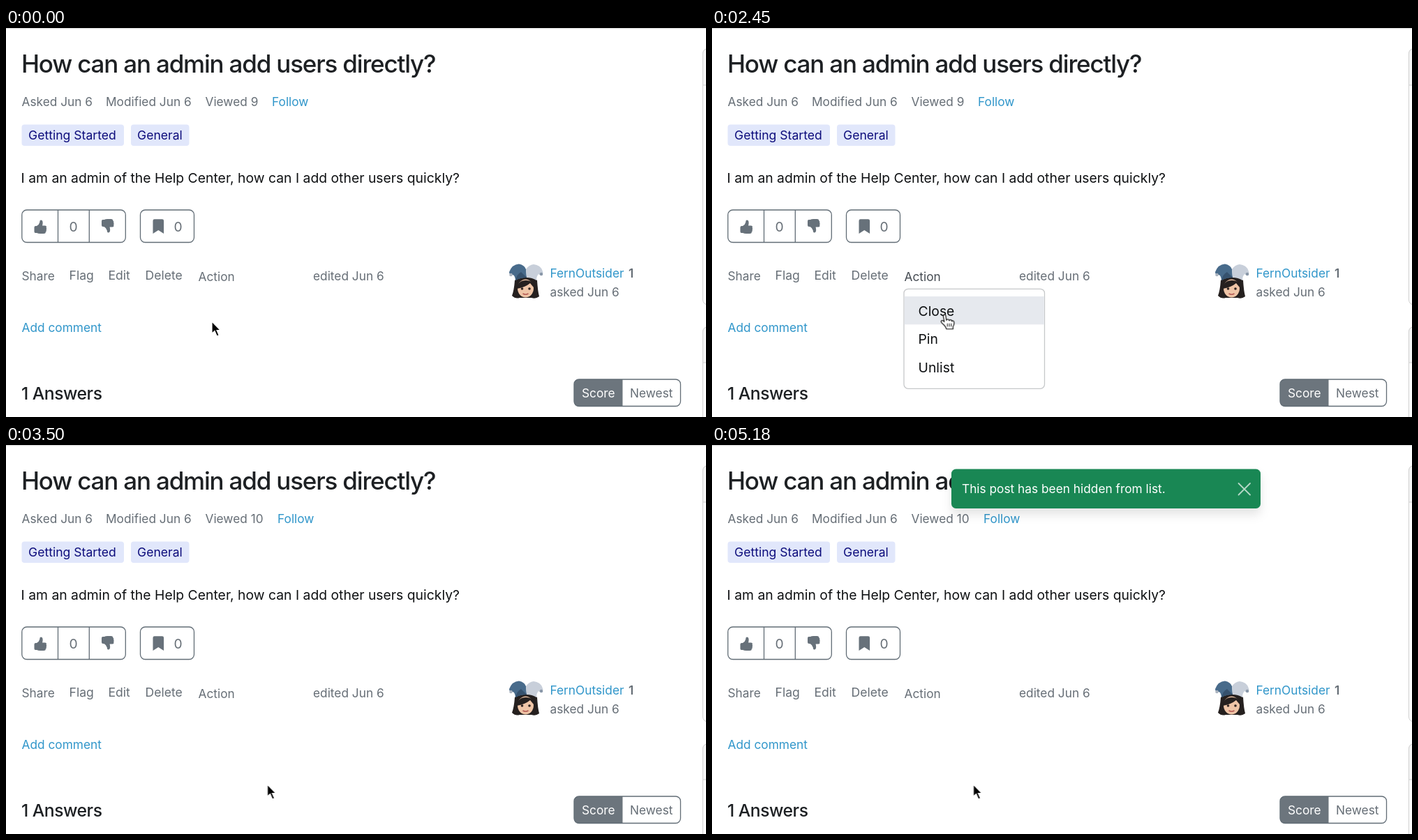
Animation of 1003x558 px, one loop 5.25 s. Source, as an HTML page:

```html
<!DOCTYPE html>
<html lang="en">
<head>
<meta charset="utf-8">
<title>Hide a post</title>
<style>
html, body { margin: 0; width: 100%; height: 100%; overflow: hidden; background: #fff; }
svg { display: block; width: 1003px; height: 558px; }
text {
  font: 400 17.3px Inter, "Open Sans", sans-serif;
  font-optical-sizing: none;
  fill: #666e76;
  white-space: pre;
}
.title { font-size: 35px; font-weight: 500; letter-spacing: -.034em; fill: #1d2023; }
.heading { font-size: 24.7px; font-weight: 500; letter-spacing: -.02em; fill: #1d2023; }
.body { font-size: 19.35px; fill: #0f1113; }
.count { font-size: 19.3px; }
.link { fill: #3096ca; }
.tag { font-size: 17.6px; fill: #0d0d7c; }
.tool { font-size: 17.6px; }
.white { fill: #fff; }
.bold { font-weight: 600; }
.frame { fill: none; stroke: #626d76; stroke-width: 1.3; }
.icon { fill: #67717a; }
.panel { fill: #fff; stroke: #cfcfcf; }

/* One shared 5250 ms clock; every switch is a hard step. */
.anim { animation: 5250ms step-end infinite; }
.arrow { animation-name: arrow; }
.hand { animation-name: hand; }
.menu { animation-name: menu; }
.close { animation-name: close; }
.pin { animation-name: pin; }
.unlist { animation-name: unlist; }
.action { animation-name: action; }
.before { animation-name: before; }
.after { animation-name: after; }
.toast { animation-name: toast; filter: drop-shadow(0 9px 7px rgba(0, 0, 0, .1)); }
.cursor { animation: cursor 5250ms linear infinite; }

@keyframes arrow { 0% { opacity: 1 } 20% { opacity: 0 } 60%, 100% { opacity: 1 } }
@keyframes hand { 0% { opacity: 0 } 20% { opacity: 1 } 60%, 100% { opacity: 0 } }
@keyframes menu { 0% { opacity: 0 } 32% { opacity: 1 } 60%, 100% { opacity: 0 } }
@keyframes close { 0% { opacity: 0 } 45.3% { opacity: 1 } 48%, 100% { opacity: 0 } }
@keyframes pin { 0% { opacity: 0 } 48% { opacity: 1 } 50.6%, 100% { opacity: 0 } }
@keyframes unlist { 0% { opacity: 0 } 50.6% { opacity: 1 } 60%, 100% { opacity: 0 } }
@keyframes action { 0% { fill: #666e76 } 20% { fill: #454b52 } 60%, 100% { fill: #666e76 } }
@keyframes before { 0% { opacity: 1 } 60%, 100% { opacity: 0 } }
@keyframes after { 0% { opacity: 0 } 60%, 100% { opacity: 1 } }
@keyframes toast {
  0% { opacity: 0 }
  69.33% { opacity: 0; animation-timing-function: linear }
  72.2%, 100% { opacity: 1 }
}
@keyframes cursor {
  0% { transform: translate(295px, 421px) }
  12% { transform: translate(295px, 421px); animation-timing-function: ease-in-out }
  22%, 44% { transform: translate(299px, 366px) }
  46.67% { transform: translate(333px, 411px) }
  50.67% { transform: translate(368px, 476px); animation-timing-function: ease-out }
  55%, 100% { transform: translate(374.5px, 487px) }
}
</style>
</head>
<body>
<svg viewBox="0 0 1003 558">
  <defs>
    <path id="thumb" d="M-8.5 1q0-2 2-2h1.5q3.6-2 4.3-5.5q0-3 1.7-3q3 0 2.6 5l-.5 3h3.6q3 0 2 3q1 1.5 0 3q.7 2-.8 3q0 2.5-3 2.5h-5q-3 0-4.6-1h-2.2q-1.6 0-1.6-2z"/>
  </defs>

  <path d="M0 .5H1003" stroke="#d9d9d9" stroke-width="1.5"/>
  <g class="panel">
    <rect x="998.5" y="30" width="60" height="367" rx="7"/>
    <path d="M998.5 82V37q0-7 7-7V82z" fill="#f6f6f6"/>
    <rect x="998.5" y="429" width="60" height="200" rx="7"/>
    <path d="M998.5 480V436q0-7 7-7V480z" fill="#f6f6f6"/>
  </g>

  <text class="title" x="22" y="63.5">How can an admin add users directly?</text>
  <text x="22.5" y="111.5">Asked Jun 6</text>
  <text x="143" y="111.5">Modified Jun 6</text>
  <g class="anim before">
    <text x="285.5" y="111.5">Viewed 9</text>
    <text class="link" x="381" y="111.5">Follow</text>
  </g>
  <g class="anim after">
    <text x="285.5" y="111.5">Viewed 10</text>
    <text class="link" x="389" y="111.5">Follow</text>
  </g>

  <g fill="#e1e7fb">
    <rect x="22.5" y="138.5" width="146.5" height="30.5" rx="4"/>
    <rect x="179" y="138.5" width="83.5" height="30.5" rx="4"/>
  </g>
  <text class="tag" x="32" y="159.5">Getting Started</text>
  <text class="tag" x="188" y="159.5">General</text>
  <text class="body" x="21.5" y="222">I am an admin of the Help Center, how can I add other users quickly?</text>

  <g class="frame">
    <rect x="22.8" y="261" width="148.5" height="46.5" rx="7"/>
    <path d="M74.5 261v46.5M119.3 261v46.5"/>
    <rect x="192.5" y="261" width="77" height="46.5" rx="7"/>
  </g>
  <g class="icon">
    <use href="#thumb" x="49" y="285"/>
    <use href="#thumb" transform="translate(145.5 284) scale(1 -1)"/>
    <path d="M210.5 276.5q0-2.3 2.3-2.3h11q2.3 0 2.3 2.3V295l-7.8-5-7.8 5z"/>
  </g>
  <text class="count" x="90.5" y="291.8">0</text>
  <text class="count" x="240.5" y="291.8">0</text>

  <text x="22.5" y="362">Share</text>
  <text class="tool" x="90.5" y="361">Flag</text>
  <text class="tool" x="146.5" y="361">Edit</text>
  <text class="tool" x="199.5" y="361">Delete</text>
  <text class="anim action" x="275.5" y="362.5">Action</text>
  <text x="440" y="361.5">edited Jun 6</text>

  <g>
    <path d="M729 362q6-6 16-6t16 6q1 16 3 23-5 4-11 2H736q-6 2-11-3 3-8 4-22z" fill="#25201f"/>
    <ellipse cx="744.5" cy="373.5" rx="11.5" ry="13" fill="#efc5a7"/>
    <path d="M732 374q1-12 13-12t13 12q-4-4-7-8-7 6-19 8z" fill="#25201f"/>
    <path d="M730 362Q729 353 725 354 721 354 721 350 725 339 735 338.500 743 340 745 346L746 358Q737 358 730 362z" fill="#486b8b"/>
    <path d="M745 346Q749 340 756 339 767 340 769.500 351 766 356 763 353 760 356 760 362 754 358 746 358z" fill="#c8cfda"/>
    <path d="M730 362q2-9 8-12l8 8q-9 0-16 4z" fill="#36526e"/>
    <circle cx="723.5" cy="354" r="2.3" fill="#aab3bf"/>
    <circle cx="767" cy="353" r="2.3" fill="#8997a8"/>
    <g fill="#302522"><circle cx="739.5" cy="374" r="1.8"/><circle cx="750" cy="374" r="1.8"/></g>
    <path d="M740.5 381q4 2.500 8 0" fill="none" stroke="#b55b55" stroke-width="1.5"/>
  </g>
  <text class="link" x="779.5" y="358">FernOutsider</text>
  <text class="bold" x="892" y="358">1</text>
  <text x="779.5" y="384.5">asked Jun 6</text>

  <text class="link" x="22.5" y="436">Add comment</text>
  <text class="heading" x="22" y="532.5">1 Answers</text>
  <path d="M821 504h62.5v38.5H821q-7 0-7-7V511q0-7 7-7z" fill="#6c757d"/>
  <rect class="frame" x="814" y="504" width="152.5" height="38.5" rx="7"/>
  <text class="white" x="825" y="529.5">Score</text>
  <text x="894" y="529.5">Newest</text>

  <g class="anim menu">
    <rect x="275" y="374.3" width="201.5" height="143" rx="6" fill="#fff" stroke="#c6c8ca" stroke-width="1.3"/>
    <g fill="#e6e9ee">
      <rect class="anim close" x="275.7" y="385" width="200" height="40.3"/>
      <rect class="anim pin" x="275.7" y="425.3" width="200" height="40.3"/>
      <rect class="anim unlist" x="275.7" y="465.6" width="200" height="40.3"/>
    </g>
    <text class="body" x="295.5" y="412.5">Close</text>
    <text class="body" x="295.5" y="453">Pin</text>
    <text class="body" x="295.5" y="493.5">Unlist</text>
  </g>

  <g class="anim toast">
    <rect x="343" y="34.5" width="443" height="56.5" rx="6.5" fill="#198754"/>
    <text class="white" x="358" y="69">This post has been hidden from list.</text>
    <path d="M754.5 55l16.5 16.5M771 55l-16.5 16.5" stroke="#b5d8c7" stroke-width="1.8" stroke-linecap="round"/>
  </g>

  <g class="cursor">
    <path class="anim arrow" d="M0 0V17.3L4 13.5 7.2 21 10.2 19.7 7 12.5H12.2z" fill="#000" stroke="#fff" stroke-width="1.2"/>
    <g class="anim hand" stroke="#111" stroke-width="1.2" stroke-linejoin="round">
      <path d="M-1.8 2Q-1.8 0 0 0 1.9 0 1.9 2L2.7 8Q3 6.3 5 6.6 6.6 6.8 6.8 8.3 7.5 7 9 7.4 10.5 7.8 10.7 9.3 11.5 8.3 12.8 9 14 9.6 13.8 12 13.8 15 12.2 17V20.5H2.8Q2 17.5-.5 15-3 12.5-4.6 10.8-5.5 9-3.7 8.4-2 8-.3 10z" fill="#fff"/>
      <path d="M4.2 12.5v4.5M7 12.5v4.5M9.8 12.5v4.5" stroke-width="1"/>
    </g>
  </g>
</svg>
</body>
</html>
```
